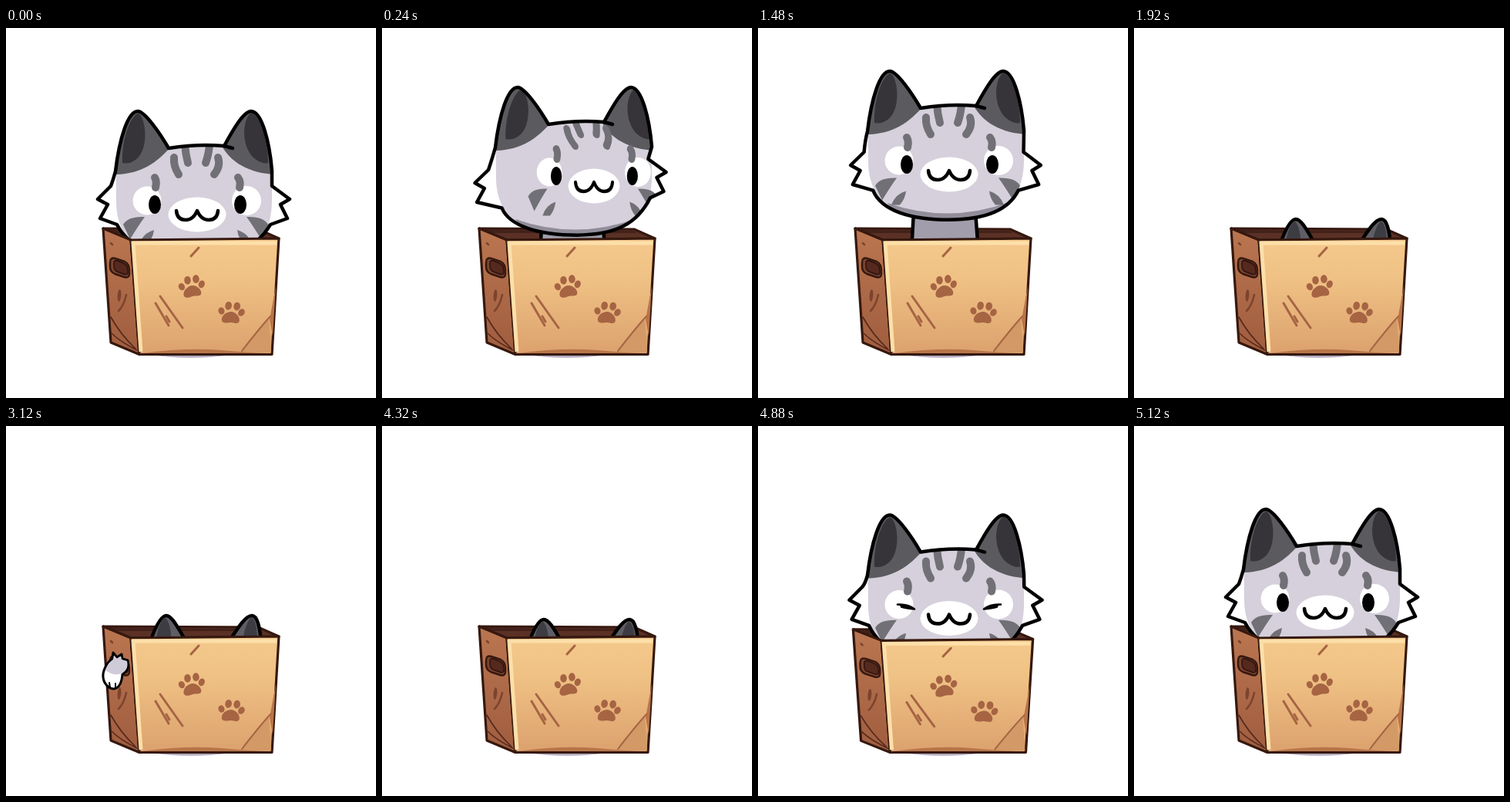
An HTML page that plays this animation: 480x480 px, repeating every 5.4 s.

```html
<!DOCTYPE html>
<html lang="en">
<head>
<meta charset="utf-8">
<title>Cat in a box</title>
<style>
html, body { margin: 0; width: 100%; height: 100%; overflow: hidden; background: #fff; }
svg { display: block; width: 100%; height: 100%; }
.ink { stroke: #000; stroke-width: 4.5; stroke-linejoin: round; stroke-linecap: round; }
.edge { stroke: #36180f; stroke-width: 3.2; stroke-linejoin: round; }
.fur { fill: none; stroke: #717076; stroke-width: 10; stroke-linecap: round; }
.mark { fill: none; stroke: #a66443; stroke-width: 3; stroke-linecap: round; }
.crack { fill: none; stroke: #582a1d; stroke-width: 1.7; stroke-linecap: round; }
</style>
</head>
<body>
<svg viewBox="0 0 480 480">
  <defs>
    <linearGradient id="card" x1="0" y1="0" x2="0" y2="1">
      <stop offset="0" stop-color="#f4c98b"/>
      <stop offset=".35" stop-color="#efc184"/>
      <stop offset="1" stop-color="#dca16e"/>
    </linearGradient>
    <linearGradient id="side" x1="0" y1="0" x2="0" y2="1">
      <stop offset="0" stop-color="#ba7650"/>
      <stop offset="1" stop-color="#a05d3f"/>
    </linearGradient>
    <clipPath id="opening"><path id="gap" d="M-200-400H700V274H162L126 260H-200Z"/></clipPath>
    <clipPath id="inHead"><use href="#fill"/></clipPath>
    <g id="print" fill="#a66443">
      <path d="M-11 8C-11 2-4-3 1-3S12 2 12 7C12 13 5 10 1 11S-11 15-11 8Z"/>
      <ellipse cx="-13" cy="-2" rx="4" ry="4.8" transform="rotate(-25 -13 -2)"/>
      <ellipse cx="-5" cy="-10" rx="4.3" ry="5.4"/>
      <ellipse cx="6" cy="-11" rx="4.3" ry="5.4"/>
      <ellipse cx="13" cy="-4" rx="4" ry="5" transform="rotate(25 13 -4)"/>
    </g>
    <path id="cheek" fill="#717076" d="M-96 33Q-90 22-68 23Q-76 34-87 52Z M-75 58Q-70 44-56 40Q-57 50-64 58Z"/>
  </defs>

  <ellipse cx="240" cy="414" rx="72" ry="13.8" fill="#b3abc0"/>

  <g class="box">
    <path class="edge" d="M126 260L327 261L354 273L162 275Z" fill="#5b3125"/>
    <path d="M130 262L326 263L331 266H140Z" fill="#42211a"/>
  </g>

  <g clip-path="url(#opening)">
    <g id="peek">
      <path class="ink" d="M189 282C196 262 203 248 210 248S224 262 236 282Z" fill="#5f5e65"/>
      <path d="M196 282C199 262 205 251 209 251C214 256 217 270 216 282Z" fill="#3d3c42"/>
      <path class="ink" d="M291 282C304 262 313 248 321 248C328 248 331 262 333 282Z" fill="#5f5e65"/>
      <path d="M309 282C311 264 317 251 321 251C327 255 328 270 328 282Z" fill="#3d3c42"/>
    </g>
    <g id="cat">
      <path class="ink" d="M-46 60L-52 170H42L34 60Z" fill="#a19daa"/>
      <path id="fill" fill="#fff"/>
      <g clip-path="url(#inHead)">
        <path d="M-106-100H97V-5C97 50 60 82 0 82S-106 50-105-5Z" fill="#d5d0db"/>
        <path d="M-80 50Q0 78 80 48C58 90-58 90-80 50Z" fill="#918d9a"/>
        <path d="M-118-39C-82-37-58-48-36-73L-77-135L-125-60Z M32-76C46-50 76-39 106-39L100-135H50Z" fill="#5b5a5f"/>
        <path id="inner" d="M-97-54C-98-90-84-118-76-118C-66-112-62-70-80-58Q-88-52-97-54Z M92-54C92-90 78-119 70-119C58-110 57-75 74-60Q84-52 92-54Z" fill="#363439"/>
        <g id="face">
          <path id="stripes" class="fur" d="M-30-61Q-31-50-24-39M-16-78Q-15-65-12-54M16-78Q15-65 11-54M27-61Q31-50 22-39"/>
          <g id="cheeks">
            <use href="#cheek"/>
            <use href="#cheek" transform="translate(-4 0) scale(-1 1)"/>
          </g>
          <circle cx="-65" cy="-5" r="18.5" fill="#fff"/>
          <circle cx="64" cy="-5" r="19" fill="#fff"/>
          <path class="fur" d="M-55-35Q-52-30-54-22M53-35Q57-30 55-22"/>
          <ellipse cy="13" rx="37.5" ry="22.5" fill="#fff"/>
          <path d="M-27 8Q-26 20-15 20Q-5 20 0 8Q5 20 15 20Q26 20 27 8" fill="none" class="ink"/>
          <g id="open">
            <ellipse cx="-55" rx="8" ry="12"/>
            <ellipse cx="56" rx="8" ry="12"/>
          </g>
          <path id="shut" class="ink" style="stroke-width:2.6" d="M-67-5Q-54-6-45 1Q-56 0-62-2M67-5Q54-6 45 1Q56 0 62-2"/>
        </g>
      </g>
      <path id="line" class="ink" fill="none"/>
      <path class="ink" d="M35-76L46-73" fill="none"/>
    </g>
  </g>

  <g class="box">
    <path class="edge" d="M126 260L162 275L173 423.5L136 408Z" fill="url(#side)"/>
    <path class="edge" d="M162 275L354 273L345 423.5L173 423.5Z" fill="url(#card)"/>
    <path d="M351 279H165L175 420" fill="none" stroke="#fddfa9" stroke-width="5"/>
    <path d="M341 376Q328 390 305 421H344Z" fill="#d39966"/>
    <path d="M176 422Q235 414 280 418T344 422Z M350 335L342 378L346 400Z" fill="#b87549"/>
    <path class="mark" d="M240 296L250 285M200 348L229 389M194 357L211 386M208 374L212 381"/>
    <path class="mark" style="stroke-width:2" d="M343 374Q330 388 306 419"/>
    <path class="crack" d="M136 375Q148 397 168 416M137 396Q148 407 170 418"/>
    <path d="M156 346Q153 360 146 367M136 279L138 281" fill="none" stroke="#7c432d" stroke-width="2.5" stroke-linecap="round"/>
    <ellipse cx="147" cy="347" rx="2.3" ry="8" fill="#7c432d" transform="rotate(5 147 347)"/>
    <path class="edge" style="stroke-width:2.4" d="M135 304Q135 297 142 299L154 303Q160 306 160 314V319Q160 325 153 323L141 319Q135 316 135 310Z" fill="#7a432e"/>
    <path d="M140 304Q140 301 145 302L154 306Q158 308 158 315V318Q157 321 152 319L144 316Q140 314 140 309Z" fill="#55291d" stroke="#2c120d" stroke-width="1.4"/>
    <use href="#print" transform="translate(241 337) rotate(-3)"/>
    <use href="#print" transform="translate(292 371) rotate(9)"/>
  </g>

  <g id="paw">
    <path class="ink" style="stroke-width:3" d="M6-7L-1-9L-2-15L-8-11L-13-17L-14-9C-22-4-27 8-26 15C-25 24-18 30-12 30C-6 29-2 24-1 11C4 8 8 3 6-7Z" fill="#fff"/>
    <path d="M5-6L-2-8L-3-12L-8-9L-12-13L-13-8C-18-4-21 1-23 6Q-12 14-2 10C3 7 7 3 5-6Z" fill="#d0cbd8"/>
    <path d="M-18 22L-17 28M-10 23L-10 28" stroke="#000" stroke-width="2" stroke-linecap="round"/>
  </g>
</svg>
<script>
const LOOP = 5400, STEP = 40;
const $ = id => document.getElementById(id);
const boxes = [...document.querySelectorAll('.box'), $('gap')];

const part = (t, a, b) => Math.min(1, Math.max(0, (t - a) / (b - a)));
const smooth = u => u * u * (3 - 2 * u);
const easeIn = u => u * u;
const easeOut = u => 1 - (1 - u) ** 3;
const overshoot = u => 1 + 3.4 * (u - 1) ** 3 + 2.4 * (u - 1) ** 2;
const ramp = (t, a, b) => smooth(part(t, a, b));
const bell = (t, a, b) => Math.sin(Math.PI * part(t, a, b));
// One fading swing to each side
const wobble = (t, a, b) => {
  const u = part(t, a, b);
  return Math.sin(2 * Math.PI * u) * (1 - u);
};

// k: head width, fs: face width, fur: cheek droop, lean: droop towards the right
const rest = { x: 0, y: 0, k: 1, fx: 0, fy: 0, fs: 1, fur: 0, lean: 0 };
const left = { ...rest, x: -8, y: -31, fx: -22, fy: -6, fs: .89, fur: 3, lean: 7 };
const right = { ...left, x: 5, fx: 22, lean: -7 };
const stretch = { ...rest, y: -52, fur: 8 };
const hidden = { ...rest, x: 18, y: 145, k: .76 };
const happy = { ...rest, y: -46, k: .97, fur: 36 };
const crouch = { ...rest, y: 8, fur: -4 };

const moves = [
  { from: 50, to: 240, pose: right, ease: overshoot },
  { from: 530, to: 760, pose: left, ease: overshoot, hop: 7 },
  { from: 1250, to: 1460, pose: stretch, ease: easeOut },
  { from: 1560, to: 1760, pose: hidden, ease: easeIn },
  { from: 4370, to: 4640, pose: happy, ease: easeOut },
  { from: 4720, to: 4840, pose: crouch, ease: easeIn },
  { from: 4840, to: 5120, pose: rest, ease: smooth }
];

function poseAt(t) {
  const p = { ...rest };
  for (const { from, to, pose, ease, hop = 0 } of moves) {
    if (t < from) break;
    const u = ease(part(t, from, to));
    for (const key in p) p[key] += (pose[key] - p[key]) * u;
    p.y -= hop * bell(t, from, to);
  }
  return p;
}

// One cheek's fur points from ear side to chin; side is -1 left, 1 right
function tuft(d, side, shift) {
  const pull = d * .2, base = side < 0 ? 112 : 97;
  const spot = (x, y, give) => `${side * (x - pull * give) + shift} ${y + d}`;
  const jaw = side < 0 ? 104 : 95;
  return [spot(base, -24, side < 0 ? 1 : .3), spot(side < 0 ? 129 : 120, -7, .7),
    spot(side < 0 ? 116 : 108, 0, .4), spot(side < 0 ? 126 : 117, 18, .5),
    `${side * (jaw - Math.max(0, d) * .65)} ${26 + d * .95}`];
}

function contour({ fur, lean }) {
  const r = tuft(fur + lean, 1, lean * .7), l = tuft(fur - lean, -1, lean * .7);
  const chin = 70 + fur * .22;
  return `M-106-43C-101-85-90-121-77-121C-68-121-48-92-37-73Q0-79 35-76` +
    `C46-96 60-121 70-121C84-121 94-80 97-44L${r.join('L')}` +
    `C78 ${55 + fur / 3} 50 ${chin} 0 ${chin}S-88 ${58 + fur / 4} ${l.reverse().join('L')}Q-109-32-106-43Z`;
}

const move = (el, value) => el.setAttribute('transform', value);
const show = (el, on) => el.setAttribute('display', on ? 'inline' : 'none');

function drawCat(t) {
  const p = poseAt(t), shape = contour(p), skew = p.fx * .012;
  const inside = t >= 1760 && t < 4400, smile = t >= 4400 && t < 4920;
  show($('cat'), !inside);
  show($('shut'), smile);
  show($('open'), !smile);
  for (const id of ['fill', 'line']) $(id).setAttribute('d', shape);
  move($('cat'), `translate(${248 + p.x} ${229 + p.y}) scale(${p.k} 1)`);
  move($('face'), `translate(${p.fx} ${p.fy}) scale(${p.fs} 1)`);
  move($('inner'), `translate(${p.fx * .2} 0)`);
  move($('stripes'), `matrix(1 0 ${skew} 1 ${25 * skew} 0)`);
  move($('cheeks'), `translate(0 ${p.fur * .2 - 7})`);
}

function drawBox(t) {
  const lift = -16.7 * bell(t, 4440, 4840);
  const squash = 1 - .05 * wobble(t, 1700, 1920) - .02 * wobble(t, 4380, 4520) - .03 * wobble(t, 4810, 5120);
  const place = `translate(240 ${424 + lift}) scale(${2 - squash} ${squash}) translate(-240 -424)`;
  boxes.forEach(b => move(b, place));
}

function drawHiding(t) {
  const swing = bell(t, 2320, 2640) + bell(t, 2880, 3120);
  const out = ramp(t, 2290, 2460) - ramp(t, 3850, 4040);
  const dip = 5 * wobble(t, 1720, 1920) + 4 * wobble(t, 3830, 4040) + 3 * ramp(t, 4280, 4320);
  show($('peek'), t >= 1760 && t < 4400);
  move($('peek'), `translate(${-2 * out} ${dip - 2 * out - 2 * swing})`);
  show($('paw'), t >= 2320 && t < 4040);
  move($('paw'), `translate(152 311) rotate(${68 * swing}) scale(${Math.min(1, out + .2)} ${out + .7 * swing * out})`);
}

const start = performance.now();
function tick() {
  const now = (performance.now() - start) % LOOP;
  const t = Math.floor(now / STEP) * STEP;
  drawCat(t);
  drawBox(t);
  drawHiding(t);
  requestAnimationFrame(tick);
}
tick();
</script>
</body>
</html>
```
